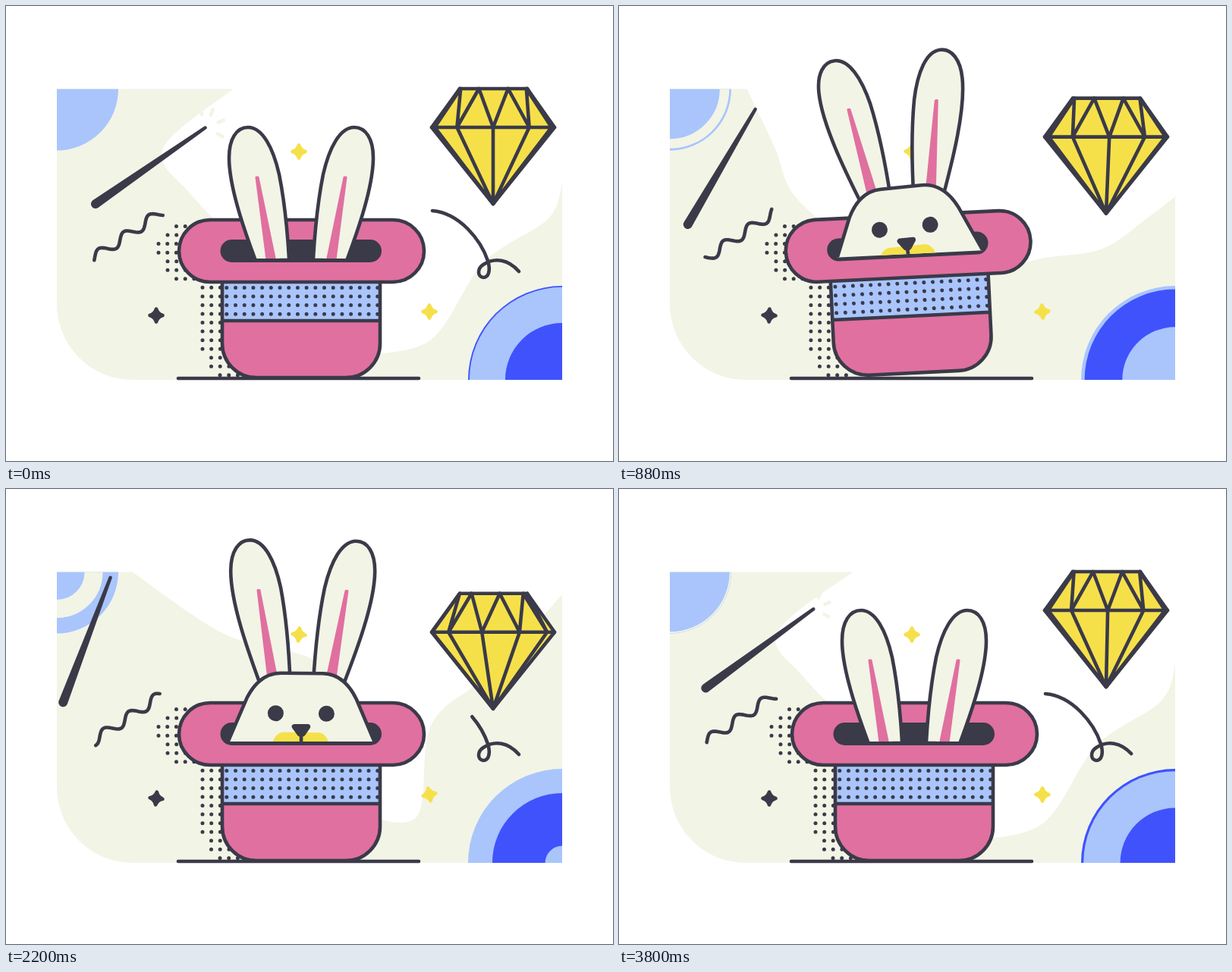
These frames come from a looping animation (800x600 px, 3.84 s). An HTML page:

```html
<!DOCTYPE html>
<html lang="en">
<head>
<meta charset="utf-8">
<title>Rabbit in a hat</title>
<style>
  html, body { margin: 0; width: 100%; height: 100%; overflow: hidden; background: #fff; }
  svg { display: block; width: 800px; height: 600px; }
  .ink { stroke: #3a3a49; stroke-width: 4.6; stroke-linecap: round; stroke-linejoin: round; }
  .line { fill: none; }
  .dots { fill: none; stroke: #3a3a49; stroke-width: 5; stroke-linecap: round; stroke-dasharray: 0 11.7; }
  .dark { fill: #3a3a49; }
  .cream { fill: #f2f4e6; }
  .pink { fill: #e0709f; }
  .sky { fill: #a9c5fc; }
  .sun { fill: #f6e04a; }
  .spark { stroke: #f2f4e6; stroke-width: 4.5; stroke-linecap: round; }
</style>
</head>
<body>
<svg viewBox="0 0 800 600">
  <defs>
    <clipPath id="panelClip"><path d="M67 109.500H733V493H67Z"/></clipPath>
    <clipPath id="hatOpening"><path d="M0 -200H800V333H0Z"/></clipPath>
    <path id="star" d="M0-8.500Q2-2 8.500 0Q2 2 0 8.500Q-2 2-8.500 0Q-2-2 0-8.500Z" stroke-width="4.600" stroke-linejoin="round"/>
    <g id="ear">
      <path class="ink cream" d="M335 260C318 215 294 150 294 108C294 83 304 68 319 68C338 68 352 95 360 130C368 170 372 215 374 260"/>
      <path class="pink" stroke="#e0709f" stroke-width="3" stroke-linejoin="round" d="M330 134H332L356 250H345Z"/>
    </g>
  </defs>

  <path class="cream" d="M67 109.500H733V493H167A100 100 0 0 1 67 393Z"/>
  <path id="blob" fill="#fff"/>
  <g clip-path="url(#panelClip)">
    <circle class="sky" cx="67" cy="109.500" r="81"/>
    <circle id="ring" class="line" stroke="#f2f4e6" cx="67" cy="109.500"/>
    <circle id="rippleBase" cx="733" cy="493" r="124"/>
    <circle id="rippleOld" cx="733" cy="493"/>
    <circle id="rippleNew" cx="733" cy="493"/>
  </g>

  <path id="squiggle" class="ink line"/>
  <path id="curl" class="ink line" pathLength="1000" d="M562 270C598 273 626 309 635 336C639 349 636 358 629 358C621 357 621 346 629 341C644 331 662 334 676 350"/>
  <path id="shadow" class="dots"/>
  <g id="stars"></g>
  <path id="burst" class="spark" d="M489 188L501 162M510 208L527 187"/>
  <path class="ink" d="M227 491H544"/>

  <g id="hat">
    <path class="pink" d="M285 340V445A45 45 0 0 0 330 490H448A45 45 0 0 0 493 445V340Z"/>
    <path class="sky" d="M285 360H493V415H285Z"/>
    <path id="bandDots" class="dots"/>
    <path class="ink line" d="M285 415H493M285 340V445A45 45 0 0 0 330 490H448A45 45 0 0 0 493 445V340Z"/>
    <rect class="ink pink" x="228" y="282" width="323" height="82" rx="41"/>
    <rect class="dark" x="282.500" y="308" width="212.500" height="30" rx="15"/>
    <g clip-path="url(#hatOpening)">
      <g id="rabbit">
        <use id="earLeft" href="#ear"/>
        <g transform="matrix(-1 0 0 1 778 0)"><use id="earRight" href="#ear"/></g>
        <path class="ink cream" d="M288 345L317 276C329 252 344 243 362 243H416C434 243 449 252 461 276L491 345"/>
        <path class="sun" d="M351 340A15 19 0 0 1 368 321H409A15 19 0 0 1 426 340Z"/>
        <circle class="dark" cx="355" cy="296" r="10.500"/>
        <circle class="dark" cx="422" cy="296" r="10.500"/>
        <path class="dark" stroke="#3a3a49" stroke-width="7" stroke-linejoin="round" d="M380 313.500H397.500L391 323H387Z"/>
        <path class="ink" d="M389 322V340"/>
      </g>
    </g>
  </g>

  <path id="wand" class="dark" d="M-6 0A6 6 0 0 0 6 0L2.200-176A2.200 2.200 0 0 0-2.200-176Z"/>
  <g id="sparks"></g>
  <g id="diamond">
    <path class="ink sun" d="M598 109H687L723 160L642 261L561 160Z"/>
    <path id="facets" class="ink line"/>
  </g>
</svg>
<script>
const LOOP = 3840;
const $ = id => document.getElementById(id);
const set = (id, attrs) => { for (const k in attrs) $(id).setAttribute(k, attrs[k]); };
const mod = (a, n) => (a % n + n) % n;
const clamp = (v, lo, hi) => Math.max(lo, Math.min(hi, v));
const ease = p => p <= 0 ? 0 : p >= 1 ? 1 : p < .5 ? 2 * p * p : 1 - 2 * (1 - p) ** 2;

// Smooth cyclic interpolation of rows [time, ...values], without overshoot.
function at(rows, t) {
  const n = rows.length;
  const row = j => rows[mod(j, n)];
  const time = j => row(j)[0] + LOOP * Math.floor(j / n);
  let i = n - 1;
  while (rows[i][0] > t) i--;
  const h = time(i + 1) - time(i), s = (t - time(i)) / h;
  return row(i).slice(1).map((a, k) => {
    const b = row(i + 1)[k + 1];
    const rate = j => (row(j + 1)[k + 1] - row(j)[k + 1]) / (time(j + 1) - time(j));
    const slope = j => {
      const p = rate(j - 1), q = rate(j);
      return p * q <= 0 ? 0 : 2 * p * q / (p + q);
    };
    return a + (b - a) * s * s * (3 - 2 * s)
      + h * s * (1 - s) * (slope(i) * (1 - s) - slope(i + 1) * s);
  });
}

// Curve through a flat list of x, y pairs.
function spline(v) {
  const last = v.length / 2 - 1;
  const pt = (i, k) => v[2 * clamp(i, 0, last) + k];
  let d = `${v[0]} ${v[1]}`;
  for (let i = 0; i < last; i++) {
    const c = k => [pt(i, k) + (pt(i + 1, k) - pt(i - 1, k)) / 6, pt(i + 1, k) - (pt(i + 2, k) - pt(i, k)) / 6];
    const [x1, x2] = c(0), [y1, y2] = c(1);
    d += `C${x1} ${y1} ${x2} ${y2} ${pt(i + 1, 0)} ${pt(i + 1, 1)}`;
  }
  return d;
}

// White blob: left edge (top x, two points), right edge (start y, three points, end y).
const blobKeys = [
  [0, 300, 207,188, 245,250, 460, 560,440, 630,338, 715,280, 228],
  [600, 157, 207,167, 242,240, 395, 560,371, 655,345, 710,280, 238],
  [1160, 180, 203,205, 228,268, 330, 550,311, 610,294, 680,274, 260],
  [1800, 148, 205,205, 310,236, 350, 554,371, 578,290, 640,215, 187],
  [2600, 210, 375,177, 486,235, 500, 530,470, 552,335, 640,268, 110],
  [3160, 428, 385,209, 275,252, 500, 535,435, 626,345, 640,262, 178]
];
function blob(t) {
  const v = at(blobKeys, t);
  const left = [v[0], 109, ...v.slice(1, 5), 330, 335];
  const right = [470, ...v.slice(5, 12), 734, v[12]];
  return `M${spline(left)}L${spline(right)}L740 90H${v[0]}Z`;
}

const ringKeys = [[0, 81], [600, 78], [1800, 45], [2600, 52], [3300, 0]];

// Halftone dots
const rowStarts = [224.5, 213, 201, 201, 213, 213, 224.5, ...Array(8).fill(259), 270.5, 270.5, 282];
set('shadow', { d: rowStarts.map((x, i) => `M${x} ${290.5 + 11.55 * i}H${i < 7 ? 250 : 310}`).join('') });
set('bandDots', { d: [0, 1, 2, 3].map(i => `M290.800 ${371.5 + 11.55 * i}H491`).join('') });

const stars = [[386, 192, '#f6e04a', 6], [198, 408, '#3a3a49', 6], [558, 403, '#f6e04a', -12]];

function facets(turn) {
  const rad = Math.PI / 180;
  const top = a => `${642.5 + 44.5 * Math.sin(clamp(1.42 * a, -90, 90) * rad)} 109`;
  let d = 'M561 160H723';
  for (let a = mod(turn, 36) - 108; a < 90; a += 36) {
    if (a < -90) continue;
    const girdle = `${642 + 81 * Math.sin(a * rad)} 160`;
    d += `M642 261L${girdle}L${top(a - 18)}M${girdle}L${top(a + 18)}`;
  }
  return d;
}

function squiggle(crest) {
  const pts = [];
  for (let u = -91; u <= 17; u += 2) {
    const v = -339.5 + 6.5 * Math.cos(2 * Math.PI * (u - crest) / 40);
    pts.push(`${.83 * u - .56 * v} ${-.56 * u - .83 * v}`);
  }
  return 'M' + pts.join('L');
}

function drawRings(t) {
  const mid = at(ringKeys, t)[0];
  set('ring', { r: mid, 'stroke-width': Math.min(24, 1.4 * (81 - mid), .85 * mid) });

  const age = mod(t - 40, 960);
  const radius = a => Math.min(124, .0975 * a - 1.73e-5 * a * a);
  const shades = ['#a9c5fc', '#4052fc'];
  const young = mod(Math.floor((t - 40) / 960), 2);
  set('rippleBase', { fill: shades[young] });
  set('rippleOld', { fill: shades[1 - young], r: radius(age + 960) });
  set('rippleNew', { fill: shades[young], r: radius(age) });
}

function drawCurl(half) {
  const from = half < 1200 ? 1000 * ease(half / 720) : 0;
  const to = half < 1200 ? 1000 : 1000 * ease((half - 1200) / 720);
  set('curl', {
    'stroke-dasharray': `${to - from} 2000`,
    'stroke-dashoffset': -from,
    visibility: half > 700 && half < 1220 ? 'hidden' : 'visible'
  });
}

function drawRabbit(t) {
  const ramp = (a, b) => ease((t - a) / (b - a));
  const bump = (a, b) => Math.sin(Math.PI * clamp((t - a) / (b - a), 0, 1)) ** 2;
  const lean = ramp(160, 480) - ramp(640, 1360);
  const drop = 92 * (1 - ramp(160, 480) + ramp(2840, 3450)) + 2 * lean;
  const tilt = -4 * lean + 7 * bump(1800, 2240) - 6 * (ramp(2620, 2780) - ramp(3160, 3400));
  const droop = bump(2860, 3460);
  set('hat', { transform: `rotate(${-3.6 * lean} 262 491)` });
  set('shadow', { transform: `translate(${-10 * lean * lean} 0)` });
  set('rabbit', { transform: `translate(0 ${drop}) rotate(${tilt} 389 335)` });
  set('earLeft', { transform: `rotate(${4.7 * droop} 353 250)` });
  set('earRight', { transform: `rotate(${1.9 * droop} 353 250)` });
  set('burst', { visibility: t > 440 && t < 760 ? 'visible' : 'hidden' });
}

function drawWand(t) {
  const lift = (1 - t / 1920) ** 2, side = Math.sin(2 * Math.PI * t / LOOP);
  const x = 79 + 39 * lift ** 2 + 8.5 * side;
  const y = 284 - 23 * lift ** 2 + 6 * side;
  const lean = 20 + 35.2 * lift, a = lean * Math.PI / 180;
  set('wand', { transform: `translate(${x} ${y}) rotate(${lean})` });

  const life = mod(t - 3700, LOOP);
  const tip = `translate(${x + 177 * Math.sin(a)} ${y - 177 * Math.cos(a)})`;
  $('sparks').innerHTML = life > 300 ? '' : [-107, -68, -22, 29].map(r =>
    `<path class="spark" d="M${10 + .055 * life} 0H${14 + .08 * life}" transform="${tip} rotate(${r})"/>`).join('');
}

function draw(t) {
  const half = t % 1920;
  const sway = ease(1 - Math.abs(t / 1920 - 1));
  set('blob', { d: blob(t) });
  drawRings(t);
  set('squiggle', { d: squiggle(2 + t / 48 + 2.5 * Math.sin(2 * Math.PI * half / 1920)) });
  drawCurl(half);
  $('stars').innerHTML = stars.map(([x, y, c, turn]) =>
    `<use href="#star" fill="${c}" stroke="${c}" transform="translate(${x} ${y}) rotate(${turn * sway})"/>`).join('');
  drawRabbit(t);
  drawWand(t);
  set('diamond', { transform: `translate(0 ${30 * sway})` });
  set('facets', { d: facets(-144 * t / LOOP) });
}

function frame() {
  draw(Math.floor(performance.now() % LOOP / 40) * 40);
  requestAnimationFrame(frame);
}
frame();
</script>
</body>
</html>
```
